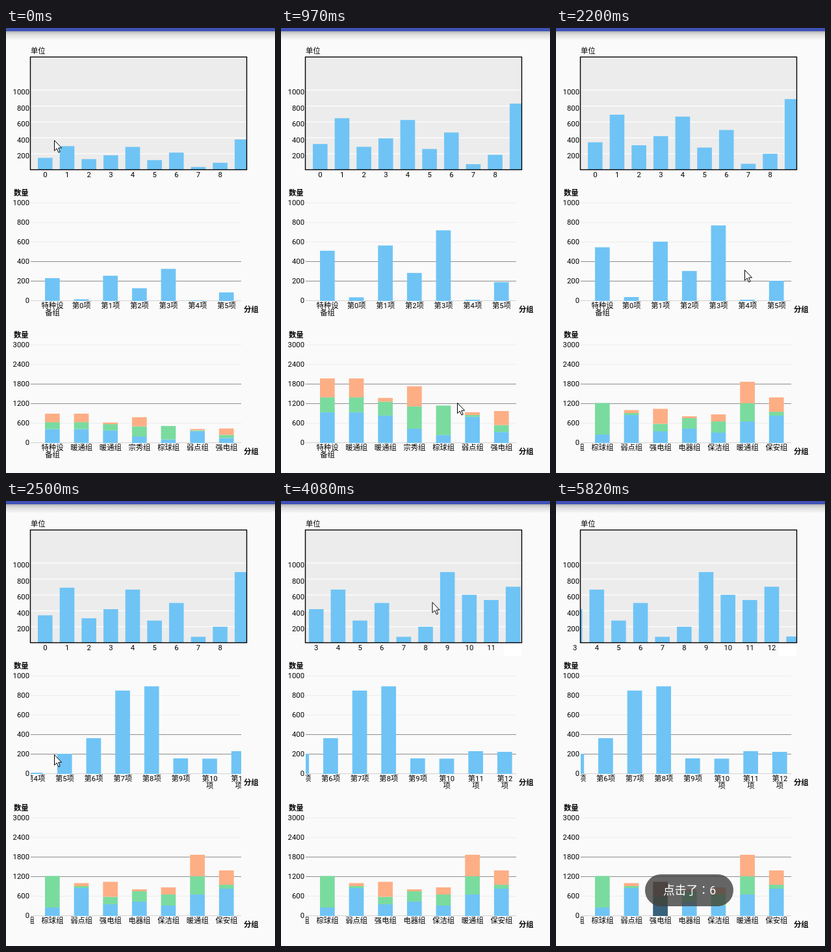
Animation of 414 by 683 pixels, one loop 6510 ms. Source, as an HTML page:

```html
<!DOCTYPE html>
<html lang="zh-CN">
<head>
<meta charset="utf-8">
<title>柱状图</title>
<style>
html, body { margin: 0; width: 100%; height: 100%; overflow: hidden; background: #fafafa; }
svg { display: block; width: 414px; height: 683px; }
text { font: 11.3px Roboto, "Noto Sans CJK SC", sans-serif; fill: #000; }
text.b { font-weight: bold; }
text.toast { font: 17.8px Roboto, "Noto Sans CJK JP", sans-serif; fill: #fff; }
</style>
</head>
<body>
<svg id="stage" viewBox="0 0 414 683">
  <defs>
    <linearGradient id="shade" x2="0" y2="1">
      <stop offset="0" stop-color="#b4b4b4"/>
      <stop offset=".35" stop-color="#dcdcdc"/>
      <stop offset="1" stop-color="#fafafa"/>
    </linearGradient>
    <clipPath id="plot"><rect x="38" y="40" width="332.5" height="178"/></clipPath>
    <clipPath id="ticks"><rect x="20" y="218" width="323" height="20"/></clipPath>
    <clipPath id="pane"><rect x="38" y="250" width="324" height="433"/></clipPath>
  </defs>
</svg>
<script>
const LOOP = 6510, STEPS = 47;
const COLORS = ['#6fc4f5', '#7adb9f', '#fdae85'];
const stage = document.getElementById('stage');

function add(parent, tag, attrs = {}, text = '') {
  const el = document.createElementNS('http://www.w3.org/2000/svg', tag);
  for (const k in attrs) el.setAttribute(k, attrs[k]);
  el.textContent = text;
  parent.appendChild(el);
  return el;
}
const rect = (p, x, y, width, height, fill, more) =>
  add(p, 'rect', { x, y, width, height, fill, ...more });
const label = (p, x, y, s, anchor = 'middle', more) =>
  add(p, 'text', { x, y, 'text-anchor': anchor, ...more }, s);
const clipped = id => add(add(stage, 'g', { 'clip-path': `url(#${id})` }), 'g');

// App bar and its shadow
rect(stage, 0, 5, 414, 14, 'url(#shade)');
rect(stage, 0, 0, 414, 5, '#3f51b5');

// Framed chart
const GAP1 = 33.66, UNIT1 = .1222;
const sales = [340, 687, 303, 417, 663, 274, 495, 70, 196, 883, 597, 532, 699, 74];
label(stage, 38, 38.5, '单位', 'start');
rect(stage, 37.5, 44.5, 333, 173, '#ececec');
for (let v = 200; v <= 1000; v += 200) {
  const y = 217.4 - v * UNIT1;
  rect(stage, 38, y - .6, 332, 1.2, '#fff');
  label(stage, 36, y + 7, v, 'end');
}
const bars1 = clipped('plot'), ticks1 = clipped('ticks');
const tickEls = sales.map((v, i) => {
  rect(bars1, 49 + GAP1 * i, -v * UNIT1, 22.6, v * UNIT1, COLORS[0]);
  return label(ticks1, 60.4 + GAP1 * i, 229, i);
});
rect(stage, 37.5, 44.5, 333, 173, 'none', { stroke: '#000', 'stroke-width': 1.4 });
const patch = rect(stage, 343, 219, 27, 19, '#fff');

// Open charts; each row is a name and its stacked values
const GAP = 44.65;
function openChart(base, max, dark, rows) {
  const unit = 151 / max;
  label(stage, 12, base - 162.3, '数量', 'start', { class: 'b' });
  label(stage, 366, base + 17, '分组', 'start', { class: 'b' });
  for (let k = 0; k <= 5; k++) {
    const y = Math.floor(base - .5 - 30.1 * k);
    rect(stage, 38, y, 324, 1, k ? (dark.includes(k) ? '#8e8e8e' : '#ededed') : '#d2d2d2');
    label(stage, 36, y + 4.4, k * max / 5, 'end');
  }
  const bars = clipped('pane'), texts = clipped('pane');
  rows.forEach(([name, ...values], i) => {
    const x = 60 + GAP * i;
    let top = 0;
    values.forEach((v, j) => {
      top += v * unit;
      rect(bars, x, -top, 22.7, v * unit, COLORS[j]);
    });
    // Long names wrap after three characters
    name.match(/第\d\d|.{1,3}/g).forEach((s, n) => label(texts, x + 11.5, base + 11 + 11.2 * n, s));
  });
  return { base, bars, texts };
}

const counts = [546, 40, 603, 305, 768, 13, 205, 364, 848, 891, 159, 156, 232, 225];
const chart2 = openChart(419, 1000, [1, 2],
  counts.map((v, i) => [i ? `第${i - 1}项` : '特种设备组', v]));
const chart3 = openChart(637, 3000, [2, 3], [
  ['特种设备组', 1000, 490, 616],
  ['暖通组', 1000, 490, 616],
  ['暖通组', 894, 457, 119],
  ['宗秀组', 467, 725, 656],
  ['棕球组', 258, 964],
  ['弱点组', 854, 60, 90],
  ['强电组', 358, 228, 457],
  ['电器组', 437, 318, 60],
  ['保洁组', 318, 338, 218],
  ['暖通组', 656, 556, 656],
  ['保安组', 834, 119, 437]
]);
const pressed = rect(chart3.bars, 60 + GAP * 6, -52.5, 22.7, 52.5, '#000', { opacity: .5 });

// Toast
const toast = add(stage, 'g');
rect(toast, 137, 573, 136, 49, '#404040', { rx: 24.5, 'fill-opacity': .8 });
label(toast, 165, 604, '点击了：6', 'start', { class: 'toast', lang: 'ja' });

// Pointer
const pointer = add(stage, 'g');
add(pointer, 'path', {
  d: 'M.5 .5V16.5L4.2 13L6.8 19L9.2 18L6.7 12.1H11.6Z',
  fill: '#fff', stroke: '#000', 'stroke-linejoin': 'round'
});
const busy = add(pointer, 'circle', {
  cx: 14.5, cy: .5, r: 5.9, fill: 'none', stroke: '#2b93ea', 'stroke-width': 3
});

// Pointer stops: step, x, y
const PATH = [
  [0, 74, 172], [7, 271, 575], [9, 330, 535], [12, 165, 507], [15, 302, 367],
  [16, 290, 371], [18, 74, 389], [20, 120, 629], [26, 181, 549], [28, 300, 150],
  [30, 165, 160], [33, 199, 592], [34, 156, 602], [37, 156, 602], [40, 337, 688]
];
function pointerAt(n) {
  const i = PATH.findIndex(p => p[0] > n);
  if (i < 0) return PATH[PATH.length - 1].slice(1);
  const [n0, x0, y0] = PATH[i - 1], [n1, x1, y1] = PATH[i];
  const f = (n - n0) / (n1 - n0);
  return [x0 + (x1 - x0) * f, y0 + (y1 - y0) * f];
}

// A swipe picks up speed, then glides to rest
const swipe = (n, from, distance) =>
  distance * (1 - Math.exp(-.415 * Math.max(0, n - from) ** 2));
const show = (el, on) => el.setAttribute('visibility', on ? 'visible' : 'hidden');
const move = (el, x, y, sy = 1) => el.setAttribute('transform', `translate(${x} ${y}) scale(1 ${sy})`);

function draw(n) {
  const grow = 1 - Math.max(0, .758 - .072 * n) ** 2;

  const s1 = swipe(n, 27, 132.2);
  move(bars1, -s1, 217, grow);
  move(ticks1, -s1, 0);
  tickEls.forEach((el, i) => show(el, 71.6 + GAP1 * i - s1 > 38));
  show(patch, s1 > 0);

  for (const [c, s] of [[chart2, swipe(n, 16, 307.5)], [chart3, swipe(n, 9, GAP * 4)]]) {
    move(c.bars, -s, c.base, grow);
    move(c.texts, -s, 0);
  }
  show(pressed, n >= 36);
  toast.setAttribute('opacity', Math.min(1, Math.max(0, (n - 36) / 4)));

  move(pointer, ...pointerAt(n));
  show(pointer, n < 42);
  show(busy, n >= 33 && n < 42);
}

const start = performance.now();
let last = -1;
function tick() {
  const now = (performance.now() - start) % LOOP;
  const n = Math.floor(now / LOOP * STEPS + .2) % STEPS;
  if (n !== last) draw(last = n);
  requestAnimationFrame(tick);
}
tick();
</script>
</body>
</html>
```
